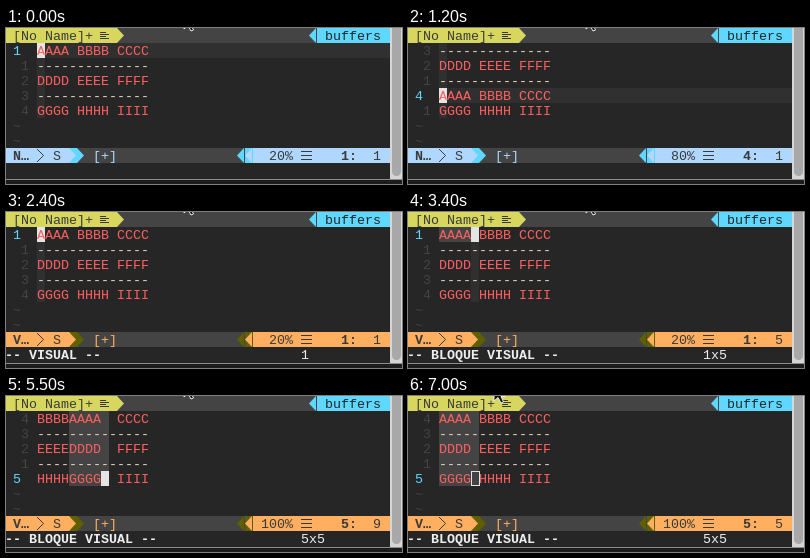
An HTML page with a canvas for the animation above (7100 ms loop, 396 by 156 pixels).

```html
<!DOCTYPE html>
<html lang="en">
<head>
<meta charset="utf-8">
<style>
  html, body { margin: 0; width: 396px; height: 156px; overflow: hidden; background: #1c1c1c; }
  canvas { display: block; }
</style>
</head>
<body>
<canvas width="396" height="156"></canvas>
<script>
const ctx = document.querySelector('canvas').getContext('2d');
const LOOP = 7100, CELL = 8, ROW = 15, LEFT = 31, RIGHT = 384;
const DASHES = '-'.repeat(14);
const LINES = ['AAAA BBBB CCCC', DASHES, 'DDDD EEEE FFFF', DASHES, 'GGGG HHHH IIII'];
const BG = '#262626', BAR = '#444444', DARK = '#303030', INK = '#3a3a3a';
const CYAN = '#5fd7ff', LIME = '#d7d75f';
const THEMES = {
  N: { main: '#afd7ff', edge: CYAN },
  V: { main: '#ffaf5f', edge: '#5f5f00' }
};

// Each step changes only the listed fields.
const STEPS = [
  [0, { row: 1, col: 1, mode: 'normal', shift: 0, pointer: [178, -15], focused: true }],
  [300, { row: 2 }], [500, { row: 3 }], [800, { row: 4 }], [1000, { row: 5 }],
  [1200, { row: 4 }], [1400, { row: 3 }], [1500, { row: 2 }], [1600, { row: 1 }],
  [2400, { mode: 'visual' }], [2600, { col: 4 }], [2900, { col: 5 }],
  [3400, { mode: 'block' }], [3700, { row: 3 }], [3800, { row: 5 }],
  ...[[4600, 1], [4700, 2], [4800, 3], [4900, 4], [5200, 5], [5500, 4],
    [5600, 3], [5800, 2], [5900, 1], [6100, 0]]
    .map(([time, shift]) => [time, { shift, col: shift + 5 }]),
  [6700, { pointer: [163, -14] }], [6800, { pointer: [135, -13] }],
  [6900, { pointer: [106, -12] }], [7000, { pointer: [86, -11], focused: false }]
];

function stateAt(time) {
  return Object.assign({}, ...STEPS.filter(([start]) => start <= time).map(([, change]) => change));
}

function rect(x, y, w, h, color) {
  ctx.fillStyle = color;
  ctx.fillRect(x, y, w, h);
}

function text(string, x, row, color, bold = false) {
  ctx.font = `${bold ? 'bold ' : ''}13.33px "Liberation Mono", monospace`;
  ctx.fillStyle = color;
  [...string].forEach((char, i) => ctx.fillText(char, x + i * CELL, row * ROW + 12));
}

function polygon(points, color) {
  ctx.beginPath();
  points.forEach(([x, y]) => ctx.lineTo(x, y));
  ctx.closePath();
  ctx.fillStyle = color;
  ctx.fill();
}

// A filled separator, one pixel narrower than its cell.
function arrow(x, row, color, pointsRight) {
  const y = row * ROW, far = x + CELL - 1;
  const [base, tip] = pointsRight ? [x, far] : [far, x];
  polygon([[base, y], [tip, y + ROW / 2], [base, y + ROW]], color);
}

function bars(x, y, gap, widths) {
  widths.forEach((w, i) => rect(x, y + i * gap, w, 1, INK));
}

function drawTabline() {
  rect(0, 0, RIGHT, ROW, BAR);
  rect(0, 0, 111, ROW, LIME);
  arrow(111, 0, LIME, true);
  text('[No Name]+', 7, 0, INK);
  bars(94, 4, 2, [6, 9, 6, 9]);
  arrow(303, 0, CYAN, false);
  rect(311, 0, RIGHT - 311, ROW, CYAN);
  text('buffers', 319, 0, BG);
}

function bufferLines({ row, mode, shift }) {
  if (mode === 'normal') {
    const lines = LINES.slice(1);
    lines.splice(row - 1, 0, LINES[0]);
    return lines;
  }
  return LINES.map(line => {
    const rest = line.slice(5);
    return rest.slice(0, shift) + line.slice(0, 5) + rest.slice(shift);
  });
}

function drawBuffer(state) {
  const { row, col, mode, shift, focused } = state;
  const cursorX = LEFT + (col - 1) * CELL;
  bufferLines(state).forEach((line, i) => {
    const n = i + 1, y = n * ROW, current = n === row;
    if (current && mode === 'normal') rect(LEFT, y, RIGHT - LEFT, ROW, DARK);
    rect(cursorX, y, CELL, ROW, DARK);
    if (mode !== 'normal' && n <= row) {
      rect(LEFT + shift * CELL, y, (col - shift) * CELL, ROW, BAR);
    }
    if (current && focused) rect(cursorX, y, CELL, ROW, '#e4e4e4');
    text(`${current ? n : Math.abs(n - row)}`, current ? 7 : 15, n, current ? CYAN : BAR);
    text(line, LEFT, n, line === DASHES ? '#e4d8b8' : '#ff5f5f');
    if (current && !focused) {
      ctx.strokeStyle = '#e4e4e4';
      ctx.strokeRect(cursorX + .5, y + .5, CELL, ROW - 1);
    }
  });
  text('~', 7, 6, BAR);
  text('~', 7, 7, BAR);
}

function drawStatus({ row, col, mode }) {
  const letter = mode === 'normal' ? 'N' : 'V';
  const { main, edge } = THEMES[letter];
  const y = 8 * ROW;
  rect(0, y, RIGHT, ROW, BAR);
  rect(0, y, 63, ROW, main);
  rect(63, y, CELL, ROW, edge);
  arrow(63, 8, main, true);
  arrow(71, 8, edge, true);
  text(letter + '…', 7, 8, INK, true);
  ctx.strokeStyle = INK;
  ctx.beginPath();
  ctx.moveTo(31, y + 1);
  ctx.lineTo(37.5, y + 7.5);
  ctx.lineTo(31, y + 14);
  ctx.stroke();
  text('S', 47, 8, INK);
  text('[+]', 87, 8, main);

  arrow(231, 8, edge, false);
  rect(239, y, CELL, ROW, edge);
  arrow(239, 8, main, false);
  rect(247, y, RIGHT - 247, ROW, main);
  text(`${row * 20}%`.padStart(4), 255, 8, INK);
  bars(295, y + 3, 4, [11, 11, 11]);
  text(`${row}:`, 335, 8, INK, true);
  text(`${col}`.padStart(3), 351, 8, INK);
}

function drawMessage({ col, row, mode, shift }) {
  if (mode === 'normal') return;
  const block = mode === 'block';
  text(block ? '-- BLOQUE VISUAL --' : '-- VISUAL --', -1, 9, '#eeeeee', true);
  text(block ? `${row}x${col - shift}` : `${col}`, 295, 9, '#eeeeee');
}

function drawWindow() {
  rect(0, 0, 396, 156, '#1c1c1c');
  rect(0, 0, RIGHT, 151, BG);
  rect(RIGHT, 0, 12, 151, '#d6d6d6');
  rect(0, 151, 396, 1, '#8c8c8c');
  ctx.fillStyle = '#a8a8a8';
  ctx.beginPath();
  ctx.roundRect(386, -8, 9, 156, 4.5);
  ctx.fill();
}

function drawPointer([x, y]) {
  ctx.save();
  ctx.translate(x, y);
  polygon([[0, 0], [0, 16], [4, 12.5], [7, 18], [9.5, 17], [7, 11.5], [11.5, 11.5]], '#111111');
  ctx.strokeStyle = '#eeeeee';
  ctx.stroke();
  ctx.restore();
}

function draw(now) {
  const state = stateAt(now % LOOP);
  drawWindow();
  drawTabline();
  drawBuffer(state);
  drawStatus(state);
  drawMessage(state);
  drawPointer(state.pointer);
}

const start = performance.now();
function tick() {
  draw(performance.now() - start);
  requestAnimationFrame(tick);
}
tick();
</script>
</body>
</html>
```
